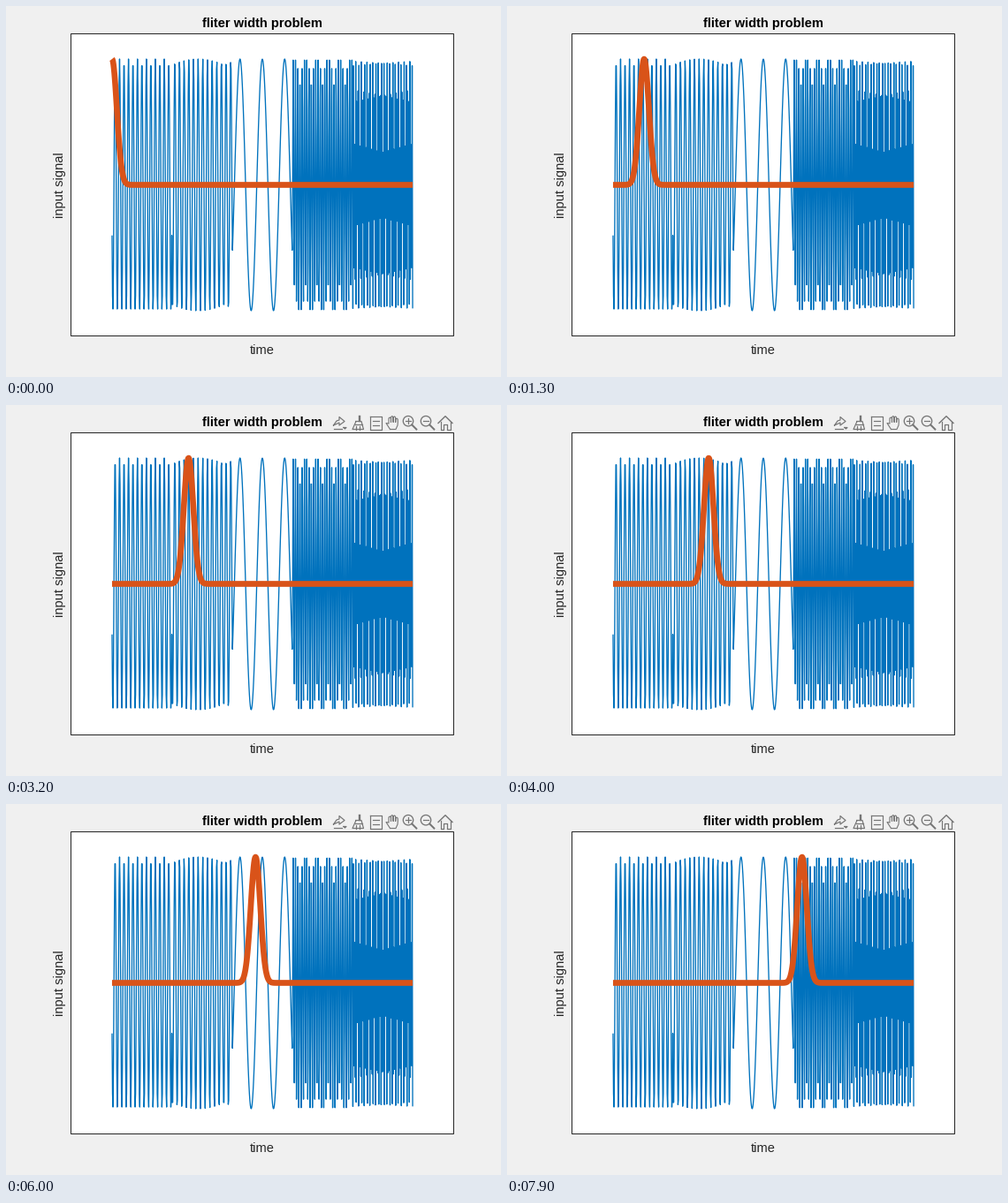
Animation of 560x420 px, one loop 8 s. Source, as a matplotlib script:

```python
import numpy as np
import matplotlib
import matplotlib.pyplot as plt
from matplotlib.animation import FuncAnimation
from matplotlib.patches import Circle, Rectangle

matplotlib.rcParams["path.simplify"] = False
matplotlib.rcParams["font.family"] = "Liberation Sans"

W, H, DPI = 560, 420, 100
FRAMES, INTERVAL = 80, 100
TOOLBAR_ON = 16
LEFT, RIGHT, TOP, BOTTOM = 73.5, 506.5, 31.5, 373.5
BLUE, ORANGE, INK, ICON = "#0072bd", "#d95319", "#262626", "#757575"


def pt(px):
    return px * 72 / DPI


def to_x(t):
    return LEFT + (t + 8) / 16 * (RIGHT - LEFT)


def to_y(v):
    return (TOP + BOTTOM) / 2 - v * (BOTTOM - TOP) / 2.4


def tone(period, size=128, crest=None):
    """Sampled cosine with a crest at the given sample, or midway."""
    mid = (size - 1) / 2 if crest is None else crest
    return np.cos(2 * np.pi * (np.arange(size) - mid) / period)


fig = plt.figure(figsize=(W / DPI, H / DPI), dpi=DPI, facecolor="#f0f0f0")
ax = fig.add_axes([0, 0, 1, 1])
ax.set_xlim(0, W)
ax.set_ylim(H, 0)
ax.axis("off")
ax.add_patch(Rectangle((LEFT, TOP), RIGHT - LEFT, BOTTOM - TOP, fc="white", ec=INK,
                       lw=pt(1), zorder=0, snap=False))

signal = np.concatenate([tone(9.5), tone(9.91, crest=55), tone(47.5), tone(4.8), tone(2.399)])
t = np.linspace(-2 * np.pi, 2 * np.pi, signal.size)

curve = dict(snap=False, solid_capstyle="butt", solid_joinstyle="round")
ax.plot(to_x(t), to_y(signal), color=BLUE, lw=pt(1.33), zorder=2, **curve)
bell, = ax.plot([], [], color=ORANGE, lw=pt(6.67), zorder=3, **curve)

label = dict(fontsize=pt(14.67), ha="center", va="baseline")
ax.text(290, 24, "fliter width problem", color="black", weight="bold", **label)
ax.text(290, 394, "time", color=INK, **label)
ax.text(65, 203, "input signal", color=INK, rotation=90, rotation_mode="anchor", **label)

# Toolbar icons, each drawn around its own centre
ICON_Y = 20
toolbar = []


def stroke(cx, *pts, lw=1.2):
    x, y = np.transpose(pts)
    toolbar.extend(ax.plot(cx + x, ICON_Y + y, color=ICON, lw=pt(lw), solid_joinstyle="round"))


def export_icon(cx):
    stroke(cx, (-6.5, 3), (-3, -2), (0, -3), (0, -6.5), (6, -1.5), (0, 3), (0, 0), (-6.5, 3))
    stroke(cx, (-6, 6.5), (3, 6.5))
    stroke(cx, (5, 5.5), (8, 5.5), (6.5, 7), (5, 5.5))


def brush_icon(cx):
    stroke(cx, (1.5, -7.5), (1.5, -2), lw=2.4)
    stroke(cx, (-2, -1.5), (4, -1.5), (6.5, 7.5), (-6, 7.5), (-2, -1.5))
    stroke(cx, (-3.5, 2), (5, 2))
    for x in (-2, 2):
        stroke(cx, (x, 3.5), (x, 7.5))


def datatip_icon(cx):
    stroke(cx, (-6.5, -7.5), (6.5, -7.5), (6.5, 7.5), (-6.5, 7.5), (-6.5, -7.5))
    for y in (-2.5, 2.5):
        stroke(cx, (-3, y), (4, y))


def hand_icon(cx):
    outline = [(-2.5, 7.5), (-7, 0.5), (-4, 1)]
    for i in range(4):
        x, tip = -4 + 2.6 * i, -7.5 + 0.9 * (i - 1.3) ** 2
        outline += [(x, tip + 1), (x + 1.2, tip), (x + 2.4, tip + 1), (x + 2.5, -0.5)]
    stroke(cx, *outline, (6, 3), (4, 7.5), (-2.5, 7.5), lw=1.1)


def zoom_icon(cx, plus):
    x, y = -2, -1.8
    toolbar.append(ax.add_patch(Circle((cx + x, ICON_Y + y), 5.7, fc="none", ec=ICON,
                                       lw=pt(1.3))))
    stroke(cx, (x + 4.2, y + 4.2), (x + 9.3, y + 9.3), lw=2)
    stroke(cx, (x - 3, y), (x + 3, y))
    if plus:
        stroke(cx, (x, y - 3), (x, y + 3))


def home_icon(cx):
    stroke(cx, (-8, 0.5), (0, -7.3), (8, 0.5), lw=1.4)
    stroke(cx, (-5.5, -1), (-5.5, 7.5), (-1.7, 7.5), (-1.7, 2), (1.7, 2), (1.7, 7.5),
           (5.5, 7.5), (5.5, -1))


export_icon(377)
brush_icon(398)
datatip_icon(418)
hand_icon(437)
zoom_icon(457, plus=True)
zoom_icon(477, plus=False)
home_icon(497)


def draw(i):
    center = -2 * np.pi + 0.1 * i
    bell.set_data(to_x(t), to_y(np.exp(-((t - center) / 0.2) ** 2 / 2)))
    for part in toolbar:
        part.set_visible(i >= TOOLBAR_ON)
    return [bell, *toolbar]


anim = FuncAnimation(fig, draw, frames=FRAMES, interval=INTERVAL, repeat=True,
                     repeat_delay=0, blit=False)
plt.show()
```
